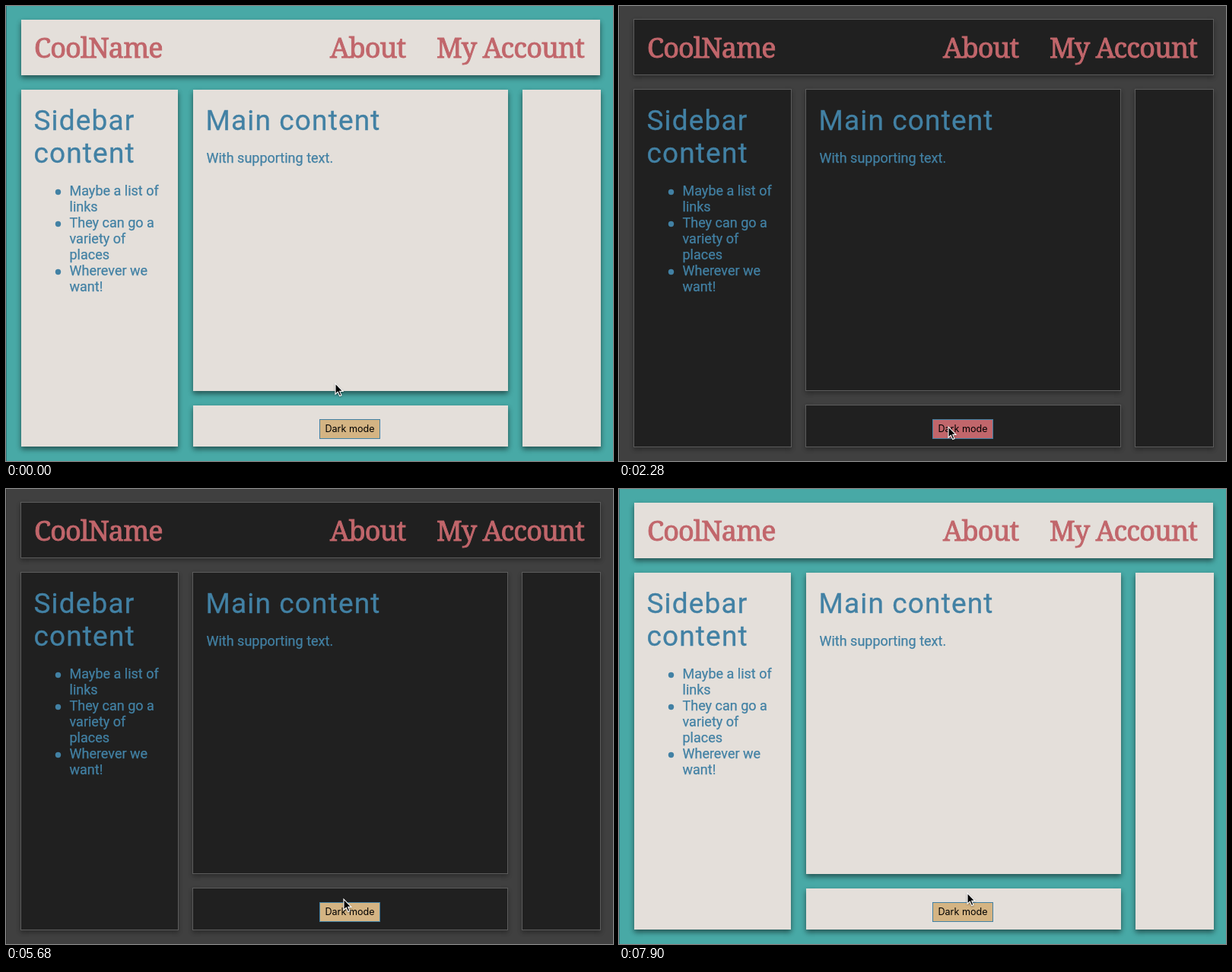
These frames come from a looping animation (798 by 598 pixels, 8000 ms). An HTML page:

```html
<!DOCTYPE html>
<html lang="en">
<head>
<meta charset="utf-8">
<title>Theme toggle</title>
<style>
  html, body { margin: 0; width: 100%; height: 100%; overflow: hidden; }
  body {
    --bg: #48a9a6; --panel: #e4dfda; --line: transparent; --edge: #31767a;
    --shadow: 0 3px 6px rgba(0, 0, 0, .26), 0 4px 7px rgba(0, 0, 0, .3);
    background: var(--bg);
  }
  body.dark {
    --bg: #404040; --panel: #202020; --line: #5c5c5c; --edge: #343434;
    --shadow: 0 3px 6px rgba(0, 0, 0, .16), 0 3px 6px rgba(0, 0, 0, .2);
  }
  #stage { position: relative; width: 798px; height: 598px; overflow: hidden; background: var(--bg); }
  #stage::before { content: ""; position: absolute; width: 1px; height: 598px; background: var(--edge); }
  .panel {
    position: absolute; box-sizing: border-box; background: var(--panel); background-clip: padding-box;
    border: 1px solid var(--line); box-shadow: var(--shadow);
  }
  body:not(.dark) .panel { background-clip: border-box; border: 0; }
  svg { position: absolute; left: 0; top: 0; }
  text { white-space: pre; }
  .brand { font: 400 36px "Noto Serif", serif; letter-spacing: -.9px; fill: #c1666b; stroke: #c1666b; stroke-width: .9; }
  .head { font: 400 37px Roboto, sans-serif; letter-spacing: 1.15px; fill: #4281a4; stroke: #4281a4; stroke-width: .3; }
  .copy { font: 400 18px Roboto, sans-serif; fill: #4281a4; stroke: #4281a4; stroke-width: .25; }
  .dot { fill: #4281a4; }
  #button { stroke: #4281a4; }
  #label { font: 400 12.6px Inter, sans-serif; text-anchor: middle; }
</style>
</head>
<body>
<div id="stage">
  <svg id="art" width="798" height="598" viewBox="0 0 798 598">
    <g id="page"></g>
    <rect id="button" x="412.5" y="543.5" width="79" height="25"/>
    <text id="label" x="452" y="560">Dark mode</text>
    <path id="cursor" d="M1 1V15.2L4.3 12.2L6.7 17.6L9 16.6L6.7 11.4H11Z"
      fill="#000" stroke="#fff" stroke-width="1.1" style="filter:drop-shadow(0 1px .8px rgba(0,0,0,.35))"/>
  </svg>
</div>
<script>
const LOOP = 8000;
const $ = id => document.getElementById(id);
const stage = $("stage"), page = $("page"), button = $("button"), label = $("label"), cursor = $("cursor");

// left, top, right, bottom of the light panels
const panels = [
  [20, 18, 781, 91], [20, 110, 226, 579], [246, 110, 660, 506],
  [246, 525, 660, 579], [679, 110, 782, 579]
].map(box => {
  const el = document.createElement("div");
  el.className = "panel";
  stage.insertBefore(el, $("art"));
  return { el, box };
});

function add(tag, attrs, content = "") {
  const el = document.createElementNS("http://www.w3.org/2000/svg", tag);
  for (const key in attrs) el.setAttribute(key, attrs[key]);
  el.textContent = content;
  page.append(el);
}
const write = (cls, x, y, words) => add("text", { class: cls, x, y }, words);

write("brand", 37, 68, "CoolName");
write("brand", 426, 68, "About");
write("brand", 566, 68, "My Account");
write("head", 36.5, 163, "Sidebar");
write("head", 36.5, 206, "content");
write("head", 262.5, 163, "Main content");
write("copy", 263.5, 206, "With supporting text.");
["Maybe a list of", "links", "They can go a", "variety of", "places", "Wherever we", "want!"]
  .forEach((line, i) => write("copy", 83.5, 249 + 21 * i, line));
[244, 286, 349].forEach(cy => add("circle", { class: "dot", cx: 68.5, cy: cy + .5, r: 3.7 }));

// Pointer moves: first step, last step, step count, end x, end y
const moves = [
  [90, 90, 1, 432, 497],
  [920, 1510, 7, 432, 551],
  [1870, 1870, 1, 432, 552],
  [2940, 2940, 1, 432, 551],
  [3080, 3880, 10, 445, 512],
  [4000, 4000, 1, 446, 510],
  [4870, 5590, 11, 443, 536],
  [5680, 6200, 7, 441, 564],
  [7120, 7120, 1, 441, 563],
  [7270, 7900, 8, 457, 530]
];
const ease = p => p * p * (3 - 2 * p);

function pointer(t) {
  let x = 432, y = 495;
  for (const [from, to, steps, endX, endY] of moves) {
    if (t < from) break;
    const gap = steps > 1 ? (to - from) / (steps - 1) : 1;
    const step = Math.min(steps, Math.floor((t - from) / gap + 1e-6) + 1);
    const p = ease(step / steps);
    x += (endX - x) * p;
    y += (endY - y) * p;
  }
  return [Math.round(x), Math.round(y)];
}

let theme = null;
function setTheme(dark) {
  if (dark === theme) return;
  theme = dark;
  document.body.classList.toggle("dark", dark);
  const grow = dark ? 1 : 0;
  for (const { el, box: [l, t, r, b] } of panels) {
    const right = dark && r !== 660 && r !== 782 ? r + 1 : r;
    const bottom = dark && b === 579 ? b + 1 : b;
    el.style.left = l - grow + "px";
    el.style.top = t - grow + "px";
    el.style.width = right - l + grow + "px";
    el.style.height = bottom - t + grow + "px";
  }
}

function draw(t) {
  const [x, y] = pointer(t);
  const hover = x >= 412 && x < 492 && y >= 542 && y < 568;
  const pressed = (t >= 2200 && t < 2280) || (t >= 6490 && t < 6580);
  setTheme(t >= 2280 && t < 6580);
  button.setAttribute("fill", hover ? "#c1666b" : "#d4b483");
  label.setAttribute("fill", pressed ? "#fff" : "#000");
  cursor.setAttribute("transform", `translate(${x} ${y})`);
}

const start = performance.now();
function tick() {
  draw((performance.now() - start) % LOOP);
  requestAnimationFrame(tick);
}
tick();
</script>
</body>
</html>
```
